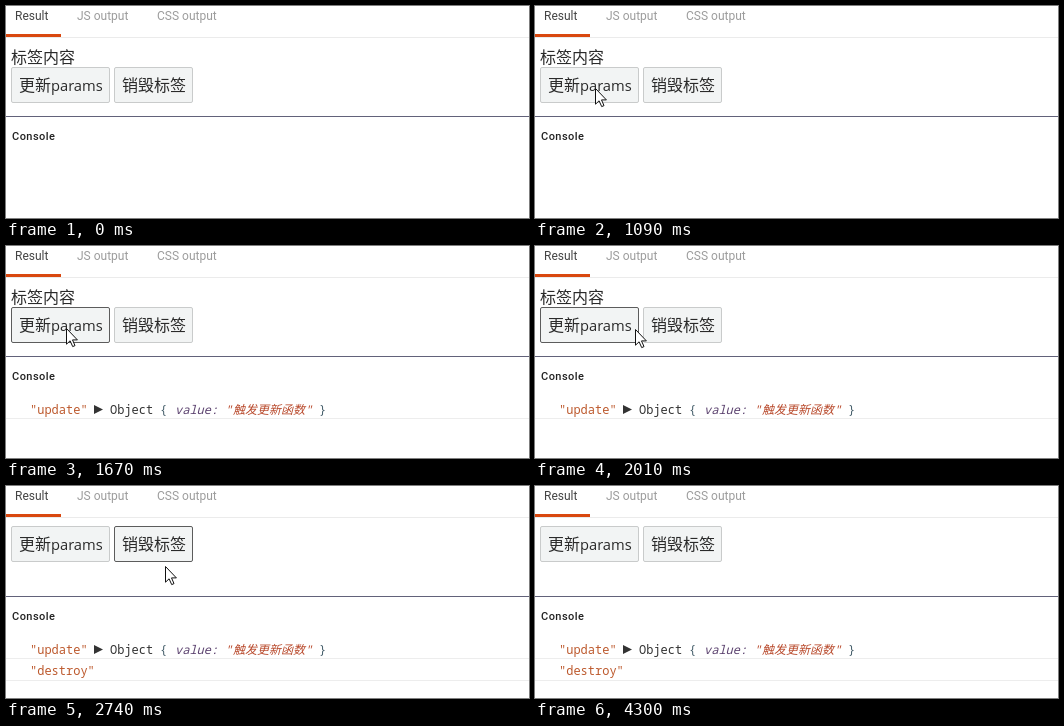
These frames come from a looping animation (523 by 212 pixels, 4370 ms). An HTML page:

```html
<!DOCTYPE html>
<html lang="zh">
<head>
<meta charset="utf-8">
<style>
  html, body { margin: 0; width: 100%; height: 100%; overflow: hidden; background: #fff; }
  svg { display: block; }
  text { white-space: pre; }
  .tab { font: 12px Roboto, sans-serif; fill: #9c9c9c; }
  .title { font: 500 11px Roboto, sans-serif; letter-spacing: .45px; fill: #222; }
  .cjk { font: 16px "Noto Sans CJK SC", "Noto Sans CJK", sans-serif; fill: #2a2a2a; }
  .latin { font: 14.7px "Open Sans", sans-serif; fill: #2a2a2a; }
  .log { font: 12px "Noto Sans Mono", "Noto Sans CJK SC", monospace; fill: #333; }
  .log .str { fill: #bd5a2e; }
  .log .key { fill: #5d4470; font-style: italic; }
  .log .val { fill: #b8482a; font-style: italic; }
  .log .brace { fill: #47606c; }
  .button { fill: #f2f4f4; stroke: #c9cbcb; }
  .button.focus { stroke: #5c5c5c; }
  .button.pressed { fill: #dcdcdc; }
</style>
</head>
<body>
<svg width="523" height="212" viewBox="0 0 523 212">
  <rect y="31" width="523" height="1" fill="#ebebeb"/>
  <rect y="28" width="55" height="3" fill="#d9480f"/>
  <text class="tab" x="9" y="14" style="fill:#444">Result</text>
  <text class="tab" x="71" y="14">JS output</text>
  <text class="tab" x="151" y="14">CSS output</text>

  <text id="label" class="cjk" x="5" y="57">标签内容</text>
  <g id="buttons">
    <rect id="update" class="button" x="5.5" y="61.5" width="98" height="35" rx="1.5"/>
    <text class="cjk" x="13" y="85">更新</text>
    <text class="latin" x="45" y="85">params</text>
    <rect id="destroy" class="button" x="108.5" y="61.5" width="78" height="35" rx="1.5"/>
    <text class="cjk" x="116" y="85">销毁标签</text>
  </g>

  <rect y="110" width="523" height="1" fill="#62627a"/>
  <text class="title" x="6" y="134">Console</text>

  <g id="updateLog" class="log">
    <text class="str" x="24" y="168">"update"</text>
    <path d="M88 159l9 4.5-9 4.5z"/>
    <text x="104" y="168">Object</text>
    <text class="brace" x="154" y="168">{</text>
    <text class="key" x="169" y="168">value:</text>
    <text class="val" x="219" y="168">"</text>
    <text class="val" x="227" y="168">触发更新函数</text>
    <text class="val" x="299" y="168">"</text>
    <text class="brace" x="313" y="168">}</text>
    <rect y="172" width="523" height="1" fill="#ededed"/>
  </g>
  <g id="destroyLog" class="log">
    <text class="str" x="24" y="189">"destroy"</text>
    <rect y="194" width="523" height="1" fill="#ededed"/>
  </g>

  <g id="cursor">
    <circle id="halo" cx="1" cy="0" r="13" fill="#f2e600" opacity=".62"/>
    <path d="M.5 .5V16.2L4.1 12.8 6.7 18.6 9 17.6 6.5 11.9H11.4Z" fill="#fff" stroke="#111"/>
  </g>
</svg>
<script>
const LOOP = 4370, STEP = 68;
const $ = id => document.getElementById(id);
const easeOut = u => 1 - (1 - u) ** 1.5;
const easeIn = u => u ** 1.5;

// The pointer is sampled in steps; each move continues from the previous one.
const moves = [
  { at: 130, steps: 8, to: [65, 88], ease: easeOut },
  { at: 680, steps: 1, to: [60, 88], ease: easeOut },
  { at: 1010, steps: 2, to: [60, 82], ease: easeOut },
  { at: 1680, steps: 4, to: [68, 86], ease: easeIn },
  { at: 1950, steps: 8, to: [159, 80], ease: easeOut, arc: 2.5 },
  { at: 3010, steps: 8, to: [526, 225], ease: easeIn },
];

function pointer(t) {
  let [x, y] = [386, 212];
  for (const { at, steps, to, ease, arc = 0 } of moves) {
    if (t < at) break;
    const u = Math.min(steps, Math.floor((t - at + 8) / STEP) + 1) / steps;
    const e = ease(u);
    x += (to[0] - x) * e;
    y += (to[1] - y) * e - arc * Math.sin(Math.PI * u * u);
  }
  return [Math.round(x), Math.round(y)];
}

function show(id, on) {
  $(id).style.display = on ? "" : "none";
}

function render(now) {
  const t = now % LOOP;
  const within = (a, b) => t >= a && t < b;
  const destroyed = t >= 2680;

  $("cursor").setAttribute("transform", `translate(${pointer(t)})`);
  $("buttons").setAttribute("transform", `translate(0 ${destroyed ? -21 : 0})`);
  $("update").classList.toggle("focus", within(1420, 2610));
  $("update").classList.toggle("pressed", within(1420, 1540));
  $("destroy").classList.toggle("focus", within(2610, 4300));
  $("destroy").classList.toggle("pressed", within(2610, 2680));
  show("halo", within(1420, 1610) || within(2610, 2740));
  show("label", !destroyed);
  show("updateLog", t >= 1540);
  show("destroyLog", destroyed);
}

function tick(now) {
  render(now);
  requestAnimationFrame(tick);
}
render(0);
requestAnimationFrame(tick);
</script>
</body>
</html>
```
